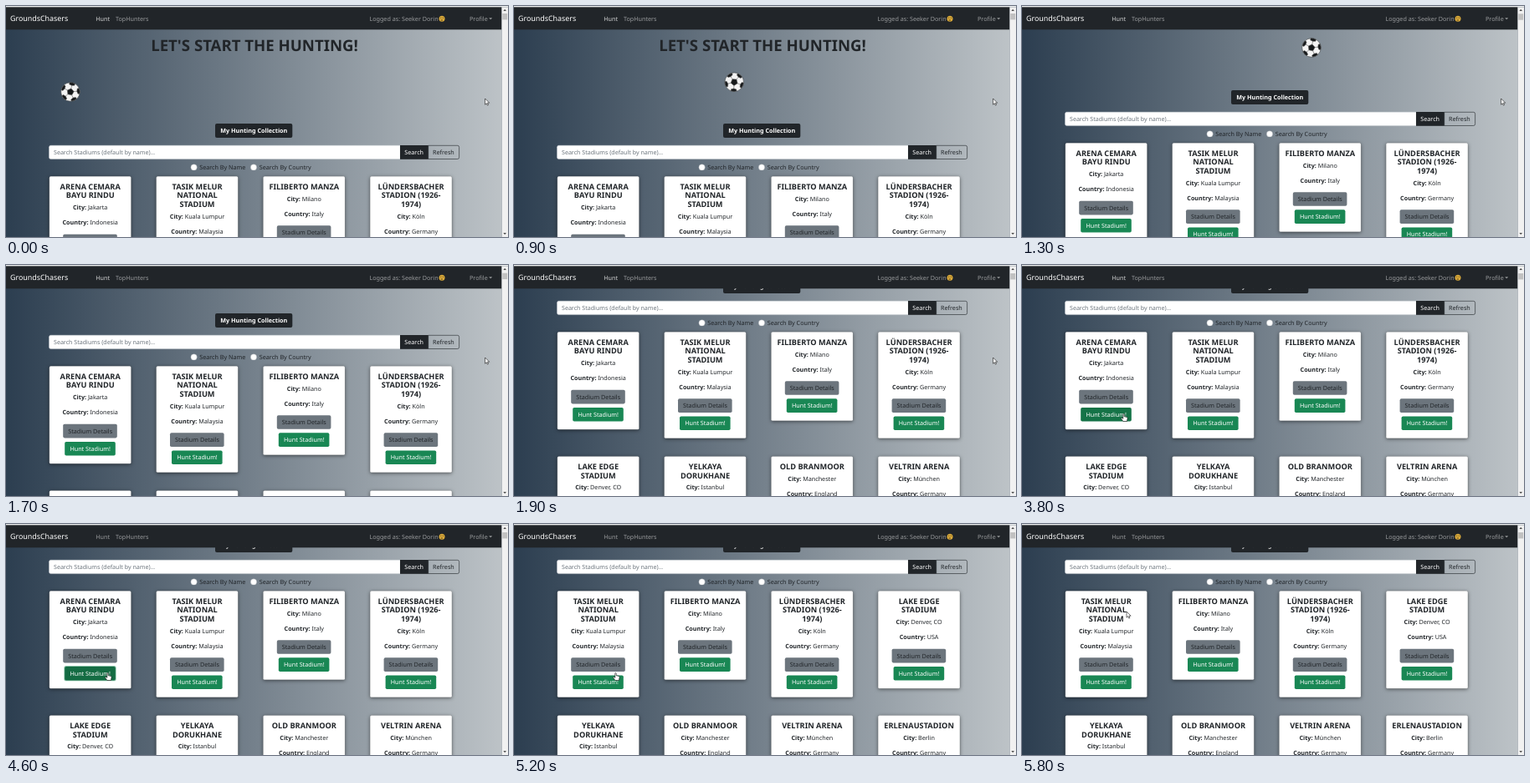
Animation of 600x277 px, one loop 5.9 s. Source, as an HTML page:

```html
<!DOCTYPE html>
<html lang="en">
<head>
<meta charset="utf-8">
<title>Stadium collection</title>
<style>
  html, body { margin: 0; width: 100%; height: 100%; overflow: hidden; background: #2c3e50; }
  svg { display: block; width: 600px; height: 277px; }
  text {
    font: 7.2px "Noto Sans", "Open Sans", sans-serif;
    fill: #212529;
    text-rendering: geometricPrecision;
    white-space: pre;
  }
  .mid { text-anchor: middle; }
  .bold, .name { font-weight: 700; }
  .name { font-size: 9.2px; }
  .title { font-size: 18.6px; font-weight: 700; }
  .brand { font-size: 8.9px; }
  .white { fill: #fff; }
  .dim { fill: #999b9d; }
  .bright { fill: #d2d3d4; }
  .hint { font-size: 7.1px; fill: #6c757d; }
  .dark { fill: #212529; }
  .card { fill: #fff; stroke: rgba(0, 0, 0, .25); stroke-width: .4; filter: drop-shadow(0 1.6px 2.2px rgba(0, 0, 0, .5)); }
  .details { fill: #6c757d; }
  .hunt { fill: #198754; }
  .hover { fill: #157347; }
  .focus { fill: #146c43; stroke: #8cc3a9; stroke-width: 1.7; paint-order: stroke; }
</style>
</head>
<body>
<svg viewBox="0 0 600 277">
  <defs>
    <linearGradient id="sky">
      <stop offset="0" stop-color="#2c3e50"/>
      <stop offset="1" stop-color="#bdc3c7"/>
    </linearGradient>
  </defs>
  <rect width="592.5" height="277" fill="url(#sky)"/>

  <g id="page">
    <text class="title mid" x="297" y="53.6">LET'S START THE HUNTING!</text>
    <g id="ball">
      <circle r="11.3" fill="#f4f4f4" stroke="#33383c" stroke-width=".6"/>
      <g id="patches" fill="#15181a" stroke="#555" stroke-width=".5"></g>
    </g>
    <rect class="dark" x="250" y="141" width="92.3" height="17" rx="2"/>
    <text class="bold white mid" x="296.3" y="152.2">My Hunting Collection</text>

    <path d="M471 167.2H53.5a2 2 0 0 0-2 2v12.4a2 2 0 0 0 2 2H471z" fill="#fff" stroke="#ced4da" stroke-width=".4"/>
    <text class="hint" x="57" y="178">Search Stadiums (default by name)...</text>
    <rect class="dark" x="471" y="167" width="33.7" height="16.8"/>
    <text class="white mid" x="487.7" y="178">Search</text>
    <path d="M504.7 167.3H539.6a2 2 0 0 1 2 2v12.2a2 2 0 0 1-2 2H504.7z" fill="none" stroke="#212529" stroke-width=".6"/>
    <text class="mid" x="522.9" y="178">Refresh</text>

    <g fill="#fff" stroke="#8d969e" stroke-width=".4">
      <circle cx="224.6" cy="193.4" r="3.7"/>
      <circle cx="296" cy="193.4" r="3.7"/>
    </g>
    <text x="231.2" y="196">Search By Name</text>
    <text x="302.8" y="196">Search By Country</text>
    <g id="before"></g>
    <g id="after"></g>
  </g>

  <rect class="dark" y="1" width="592.5" height="27.3"/>
  <rect width="600" height="1.3" fill="#eceeef"/>
  <text class="brand white" x="5" y="18.1">GroundsChasers</text>
  <text id="link" x="107.3" y="17.8">Hunt</text>
  <text class="dim" x="131" y="17.8">TopHunters</text>
  <text class="dim" x="434.4" y="17.8">Logged as: Seeker Dorin</text>
  <circle cx="521" cy="15.3" r="3.5" fill="#d9a93a"/>
  <path d="M519.2 14.2h1.1M521.9 14.2h1.1M519.7 17h2.2" stroke="#54401a" stroke-width=".9"/>
  <text class="dim" x="554" y="17.8">Profile</text>
  <path d="M577.2 14.2h4l-2 2.1z" class="dim"/>

  <rect x="592.5" y="1.3" width="7.5" height="276" fill="#f1f1f1"/>
  <path d="M594.4 6h3.6l-1.8-2.2z" fill="#505050"/>
  <path d="M594.4 272h3.6l-1.8 2.2z" fill="#505050"/>
  <rect id="thumb" x="593.3" y="9" width="5.9" height="7.4" fill="#c1c1c1"/>

  <g id="cursor" stroke="#111" stroke-width=".6" stroke-linejoin="round" fill="#fff">
    <path id="arrow" d="M0 0V7.2L1.7 5.7 2.8 8.1 3.9 7.6 2.9 5.2H5.1z"/>
    <path id="hand" d="M-.7.6Q0-.4.7.6V3.4L4 4.2Q4.7 4.5 4.6 5.4L4 9.2H-.6L-2.9 6Q-3 4.9-1.9 5.1L-.7 6z"/>
  </g>
</svg>

<script>
const LOOP = 5900, STEP = 100;
const HOVER = 3000, CLICK = 4400, REMOVE = 5000, LEAVE = 5500;
const $ = id => document.getElementById(id);

const stadiums = [
  ["ARENA CEMARA|BAYU RINDU", "Jakarta", "Indonesia"],
  ["TASIK MELUR|NATIONAL|STADIUM", "Kuala Lumpur", "Malaysia"],
  ["FILIBERTO MANZA", "Milano", "Italy"],
  ["LÜNDERSBACHER|STADION (1926-|1974)", "Köln", "Germany"],
  ["LAKE EDGE|STADIUM", "Denver, CO", "USA"],
  ["YELKAYA|DORUKHANE", "Istanbul", "Turkey"],
  ["OLD BRANMOOR", "Manchester", "England"],
  ["VELTRIN ARENA", "München", "Germany"],
  ["ERLENAUSTADION", "Berlin", "Germany"]
];

const label = (cls, y, body) => `<text class="mid ${cls}" x="48.9" y="${y}">${body}</text>`;
const field = (y, key, value) => label("", y, `<tspan class="bold">${key}:</tspan> ${value}`);
const button = (cls, y, w, body, ink) =>
  `<rect class="${cls}" x="${48.7 - w / 2}" y="${y - 8.3}" width="${w}" height="16.6" rx="1.8"/>` +
  label(ink, y + 2.6, body);

function card([name, city, country], i) {
  const lines = name.split("|"), h = lines.length * 10.55;
  const x = 51.8 + i % 4 * 127.8, y = i < 4 ? 204.3 : 353.4;
  return `<g transform="translate(${x} ${y})">
    <rect class="card" width="97.7" height="${95.9 + h}" rx="1.6"/>
    ${lines.map((line, k) => label("name", 15.6 + k * 10.55, line)).join("")}
    ${field(18.9 + h, "City", city)}
    ${field(36.8 + h, "Country", country)}
    ${button("details", 56.7 + h, 64.6, "Stadium Details", "")}
    ${button("hunt", 77.8 + h, 60.6, "Hunt Stadium!", "white")}
  </g>`;
}

const before = $("before"), after = $("after");
before.innerHTML = stadiums.slice(0, 8).map(card).join("");
after.innerHTML = stadiums.slice(1).map(card).join("");
const target = before.querySelector(".hunt");

// Ball: a central pentagon, seams and five rim patches
const polar = (r, deg) => {
  const a = deg * Math.PI / 180;
  return `${(r * Math.sin(a)).toFixed(2)} ${(-r * Math.cos(a)).toFixed(2)}`;
};
const turns = [0, 72, 144, 216, 288];
$("patches").innerHTML =
  `<path d="M${turns.map(a => polar(4.2, a)).join("L")}z"/>` +
  turns.map(a => `<path d="M${polar(4.2, a)}L${polar(8, a)}"/>
    <path d="M${polar(7.8, a)}L${polar(9.2, a + 20)}L${polar(11.2, a + 17)}
      A11.2 11.2 0 0 0 ${polar(11.2, a - 17)}L${polar(9.2, a - 20)}z"/>`).join("");

// Linear interpolation through [time, ...values] points
function along(points, t) {
  if (t <= points[0][0]) return points[0].slice(1);
  for (let i = 1; i < points.length; i++) {
    const [a, b] = [points[i - 1], points[i]];
    if (t <= b[0]) {
      const u = (t - a[0]) / (b[0] - a[0]);
      return a.slice(1).map((v, k) => v + (b[k + 1] - v) * u);
    }
  }
  return points[points.length - 1].slice(1);
}

const scrollPath = [[900, 0], [1300, 40], [1700, 83], [1900, 124]];
const mousePath = [
  [2000, 572.6, 111], [2200, 526, 118], [2500, 347, 144], [2800, 168, 171],
  [3000, 121.5, 178.3], [5400, 121.5, 178.3], [5800, 125, 105]
];

const move = (id, x, y) => $(id).setAttribute("transform", `translate(${x} ${y})`);
const show = (node, on) => node.setAttribute("visibility", on ? "visible" : "hidden");

function draw(t) {
  const [scroll] = along(scrollPath, t);
  move("page", 0, -scroll);
  move("thumb", 0, scroll / 124);

  const u = t / 1300, rise = 1 - (1 - Math.min(u, 1)) ** 2;
  move("ball", 77 + 269 * u, 103 - 13 * rise);
  show($("ball"), t < 1900);
  $("patches").setAttribute("transform", `rotate(${12 + 144 * u})`);

  const [x, y] = along(mousePath, t);
  const pointing = t >= HOVER && t < LEAVE;
  move("cursor", x, y);
  show($("hand"), pointing);
  show($("arrow"), !pointing);

  target.setAttribute("class", t >= CLICK ? "focus" : t >= HOVER ? "hover" : "hunt");
  $("link").setAttribute("class", t >= CLICK ? "dim" : "bright");
  show(before, t < REMOVE);
  show(after, t >= REMOVE);
}

const start = performance.now();
function tick() {
  const t = (performance.now() - start) % LOOP;
  draw(Math.floor(t / STEP) * STEP);
  requestAnimationFrame(tick);
}
tick();
</script>
</body>
</html>
```
